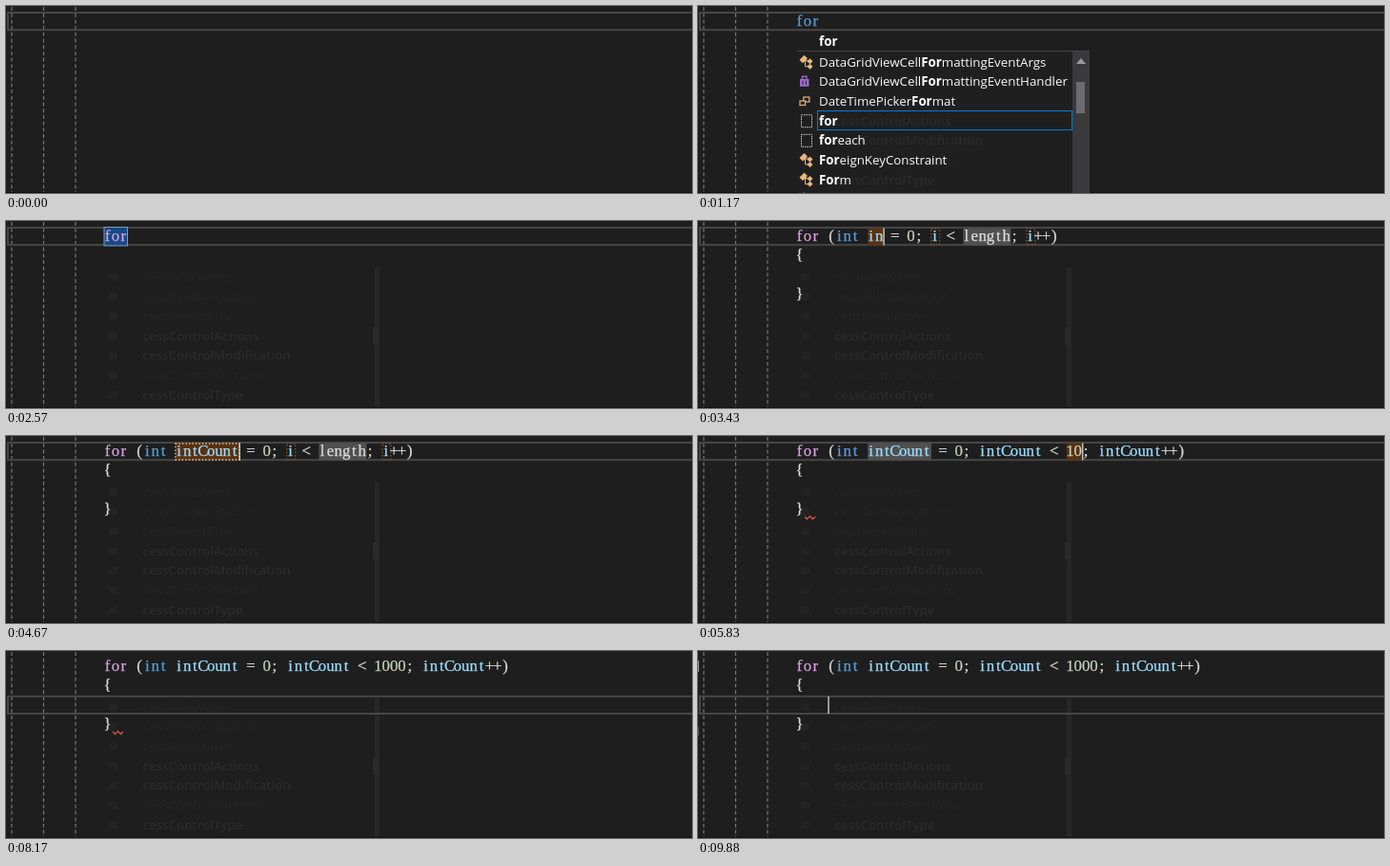
Animation, 720 px wide and 197 px high, one loop 9.97 s. Source, as an HTML page:

```html
<!DOCTYPE html>
<html lang="en">
<head>
<meta charset="utf-8">
<title>For loop snippet</title>
<style>
  html, body { margin: 0; width: 100%; height: 100%; overflow: hidden; background: #1e1e1e; }
  svg { display: block; width: 720px; height: 197px; }
  .code { font: 16.8px "Liberation Serif", "Noto Serif", serif; text-anchor: middle; white-space: pre; stroke-width: 0.25; }
  .ui { font: 13.3px "Open Sans", "Noto Sans", sans-serif; fill: #fafafa; }
  .ui tspan { font-weight: 700; fill: #fff; }
</style>
</head>
<body>
<svg id="stage" viewBox="0 0 720 197"></svg>
<script>
const LOOP = 9970, LEFT = 103, CELL = 8.35, ROW = 20.2;
const C = {
  plain: '#dcdcdc', key: '#569cd6', flow: '#d8a0df', name: '#9cdcfe', num: '#c5d3bd',
  active: '#5a3210', field: '#505050', line: '#464646'
};
const stage = document.getElementById('stage');
const colX = c => LEFT + c * CELL;
const esc = s => s.replace(/&/g, '&amp;').replace(/</g, '&lt;');

function rect(x, y, w, h, fill, stroke = 'none', extra = '') {
  return `<rect x="${x}" y="${y}" width="${w}" height="${h}" fill="${fill}" stroke="${stroke}" ${extra}/>`;
}
function path(d, fill, stroke = 'none', extra = '') {
  return `<path d="${d}" fill="${fill}" stroke="${stroke}" ${extra}/>`;
}

// One glyph per editor cell, centred in it.
function code(text, col, row, fill) {
  const xs = [...text].map((_, i) => (colX(col + i + 0.5) - 0.6).toFixed(1)).join(' ');
  return `<text class="code" x="${xs}" y="${21.1 + row * ROW}" fill="${fill}" stroke="${fill}">${esc(text)}</text>`;
}
function codeRun(parts) {
  let col = 0;
  return parts.map(([text, fill]) => {
    const out = code(text, col, 0, fill);
    col += text.length;
    return out;
  }).join('');
}

const guides = [6, 39.5, 73].map(x =>
  path(`M${x} 1V196`, 'none', '#777', 'stroke-width="1.2" stroke-dasharray="4 2.7"')).join('');
const lineBox = row => rect(2, 7 + row * 40.8, 730, 18.2, 'none', C.line, 'stroke-width="2"');
const caret = (x, y) => rect(x, y, 1.2, 18, '#e6e6e6');

// Completion list
const early = ['AccessibleEvents', 'AccessibleNavigation', 'AcceptRejectRule', 'AccessControlActions',
  'AccessControlModification', 'AccessControlSections', 'AccessControlType'].map(s => [s, 'class']);
const matched = [
  ['DataGridViewCell*For*mattingEventArgs', 'class'],
  ['DataGridViewCell*For*mattingEventHandler', 'delegate'],
  ['DateTimePicker*For*mat', 'enum'],
  ['*for*', 'snippet'],
  ['*for*each', 'snippet'],
  ['*For*eignKeyConstraint', 'class'],
  ['*For*m', 'class'],
  ['', 'class']
];
const icons = {
  class: path('M106.5-2.5l5-5 3.5 3.5-5 5zM114.5-1l3-3 3 3-3 3zM114.5 4.5l3-3 3 3-3 3z', '#e8b878')
    + path('M112-1.5h4M112.5-1.5v6h3', 'none', '#e8b878'),
  delegate: rect(107, -3, 9.5, 8, '#9a68c8') + path('M109.5-3v-2.5h4.5v2.5', 'none', '#9a68c8', 'stroke-width="1.4"')
    + path('M110-1v4M113.5-1v4', 'none', '#2a2030'),
  enum: rect(110.8, -4.5, 6, 5, 'none', '#d8ac74', 'stroke-width="1.3"')
    + rect(107, -0.5, 5.5, 4.5, '#212122', '#d8ac74', 'stroke-width="1.3"'),
  snippet: rect(108.5, -6.5, 11, 13, 'none', '#c8c8c8', 'stroke-dasharray="1.6 0.9"')
};
const rowY = i => 59.2 + i * 20.65;
const bold = s => s.replace(/\*(\w+)\*/g, '<tspan>$1</tspan>');
const item = ([text, icon], i) =>
  `<g transform="translate(0 ${rowY(i).toFixed(1)})">${icons[icon]}<text class="ui" x="127" y="4.6">${bold(text)}</text></g>`;

// Faint remains of the first list
const traces = early.map(([text], i) =>
  `<text class="ui" x="128" y="${rowY(i) + 4.6}" style="fill:${i < 3 || i === 5 ? '#232323' : '#2b2b2b'};font-weight:600"
    clip-path="url(#cut)">${text}</text>`).join('');
const shade = traces + early.map((_, i) => rect(108, rowY(i) - 4, 9, 8, '#232323')).join('')
  + rect(387, 49, 5, 148, '#272727') + rect(385, 112, 6, 18, '#2a2a2a');

function popup(items, right, thumb, under = '') {
  const bar = right - 18;
  return rect(104, 48, right - 104, 149, '#1f1f20') + under
    + path(`M104 47.5H${right}`, 'none', '#46464a')
    + rect(bar, 48, 18, 149, '#3a3a3d')
    + path(`M${bar + 4} 61l5-6 5 6z`, '#999')
    + rect(bar + 4, thumb, 9, 33, '#6c6c6c')
    + rect(125.5, 110.5, bar - 126, 20, 'none', '#0a78c8', 'stroke-width="1.1"')
    + items.map(item).join('');
}
const lists = {
  early: popup(early, 405, 66),
  matched: rect(104, 27, 250, 20, '#1e1e1e')
    + '<text class="ui" x="127" y="41.6"><tspan>for</tspan></text>' + popup(matched, 411, 80, traces)
};

function loopLine(s) {
  const nameCol = 9, n = s.name.length;
  const second = nameCol + n + 6, limCol = second + s.other.length + 3;
  const third = limCol + s.lim.length + 2;
  const back = (col, len, fill) => rect(colX(col), 7.5, len * CELL, 18, fill);
  const dots = (col, len, color) =>
    rect(colX(col) - 0.3, 8, len * CELL + 0.6, 17, 'none', color, 'stroke-width="1.3" stroke-dasharray="1.5 2"');
  let out = '';
  if (s.field) {
    const onName = s.field === 'name';
    out += back(nameCol, n, onName ? C.active : C.field) + back(limCol, s.lim.length, onName ? C.field : C.active);
    if (onName) out += dots(second, 1, '#875026') + dots(third, 1, '#875026');
    if (s.dotted) out += dots(nameCol, n, '#e6c69c');
  }
  out += codeRun([
    ['for', C.flow], [' (', C.plain], ['int ', C.key], [s.name, s.name === 'int' ? C.key : C.name],
    [' = ', C.plain], ['0', C.num], ['; ', C.plain], [s.other, C.name], [' < ', C.plain],
    [s.lim, s.lim === 'length' ? C.plain : C.num], ['; ', C.plain], [s.other, C.name], ['++)', C.plain]
  ]);
  out += code('{', 0, 1, C.plain) + code('}', 0, 3, C.plain);
  if (s.field && s.caret) {
    const end = s.field === 'name' ? nameCol + n : limCol + s.lim.length;
    out += caret(colX(end) - 0.4, 7.5);
  }
  return out;
}

function draw(s) {
  let out = '<clipPath id="cut"><rect x="143" y="40" width="200" height="160"/></clipPath>'
    + (s.shade ? shade : '') + guides + lineBox(s.body ? 1 : 0)
    + rect(0, 196, 720, 1, '#111');
  if (s.head) {
    if (s.selected) out += rect(103, 6.5, 24.5, 19.5, '#164a85', '#7f9db8');
    out += code(s.head, 0, 0, s.color || C.plain);
  }
  if (s.list) out += `<g opacity="${s.alpha ?? 1}">${lists[s.list]}</g>`;
  if (s.name) out += loopLine(s);
  if (s.squiggle) out += path('M112 85l2.5 2.5 3-3 3 3 2.5-2.5', 'none', '#d0504a', 'stroke-width="1.4"');
  if (s.body && s.caret) out += caret(136.4, 48);
  if (s.marks) out += rect(0, 10, 1, 12, '#999') + rect(0, 80, 1, 9, '#555');
  return out;
}

// Each step changes only the listed properties; the rest carry over.
const steps = [
  [0, {}],
  [300, { head: 'f' }],
  [700, { head: 'fo', list: 'early', alpha: 0.6 }],
  [770, { alpha: 1 }],
  [1170, { head: 'for', color: C.key, list: 'matched', shade: true }],
  [2110, { alpha: 0.6 }],
  [2190, { alpha: 0.25, color: C.flow }],
  [2270, { list: '' }],
  [2490, { selected: true }],
  [2820, { head: '', name: 'i', other: 'i', lim: 'length', field: 'name' }],
  [2970, { caret: true }],
  [3430, { name: 'in' }],
  [3510, { name: 'int' }],
  [3890, { name: 'intC' }],
  [4050, { name: 'intCo' }],
  [4200, { name: 'intCou' }],
  [4360, { name: 'intCoun' }],
  [4510, { name: 'intCount' }],
  [4670, { dotted: true }],
  [4990, { other: 'intCount', field: 'limit', dotted: false }],
  [5370, { lim: '1' }],
  [5680, { lim: '10' }],
  [5830, { squiggle: true }],
  [6230, { lim: '100' }],
  [7070, { lim: '1000' }],
  [7620, { field: '', body: true, caret: false }],
  [7710, { caret: true }],
  [8170, { caret: false }],
  [8630, { caret: true }],
  [8780, { marks: true }],
  [9330, { caret: false }],
  [9480, { squiggle: false }],
  [9880, { caret: true }]
];
let state = {};
const scenes = steps.map(([at, change]) => {
  state = { ...state, ...change };
  return { at, svg: draw(state) };
});

let shown;
function tick() {
  const t = performance.now() % LOOP;
  const scene = scenes.findLast(s => s.at <= t);
  if (scene !== shown) {
    stage.innerHTML = scene.svg;
    shown = scene;
  }
  requestAnimationFrame(tick);
}
tick();
</script>
</body>
</html>
```
